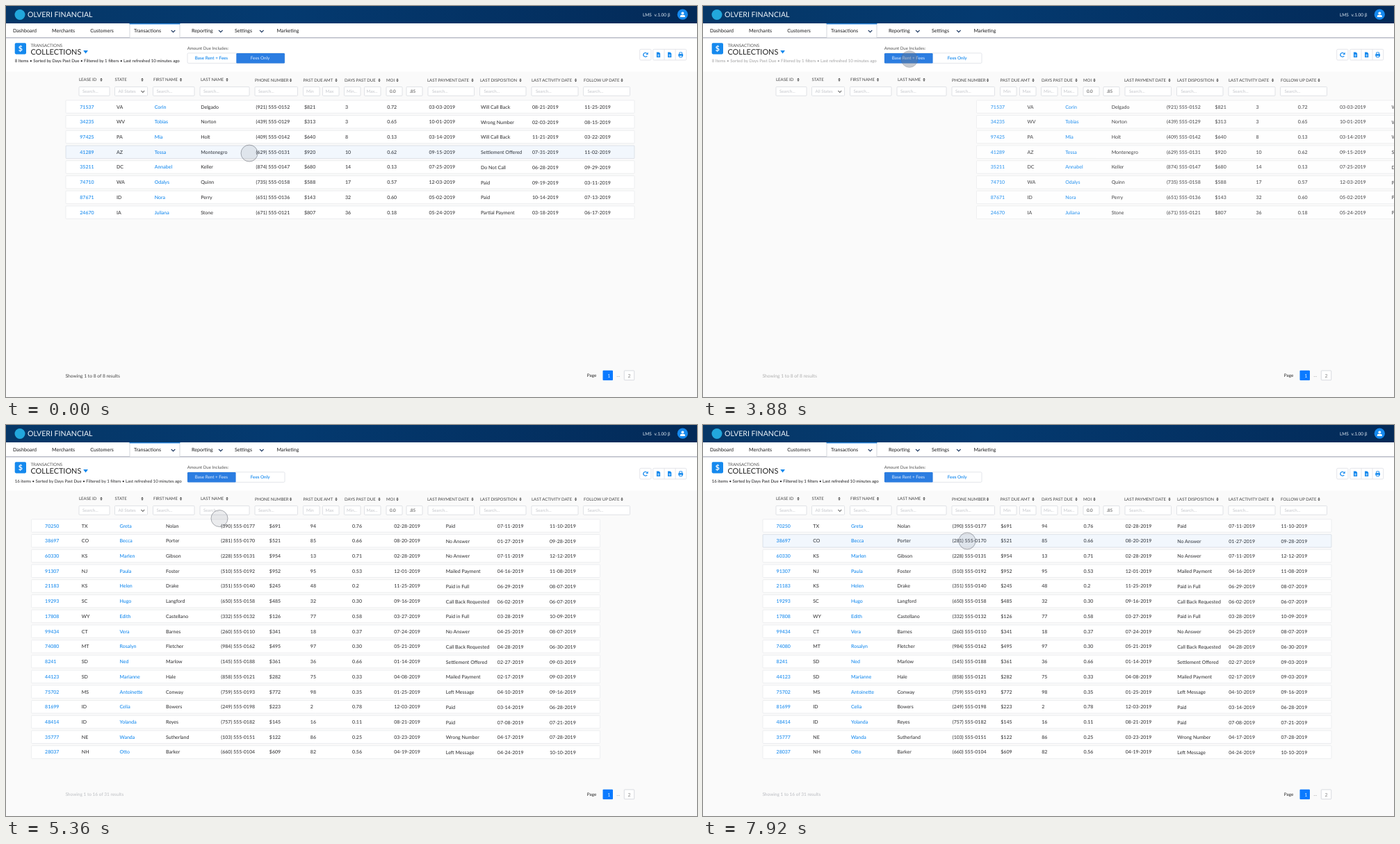
Recreate the animation shown at these times as an HTML page with a canvas. Size 994 by 563 pixels, loop 8000 ms.

```html
<!DOCTYPE html>
<html lang="en">
<head>
<meta charset="utf-8">
<title>Collections</title>
<style>
html, body { margin: 0; width: 100%; height: 100%; overflow: hidden; background: #fafafa; }
canvas { display: block; width: 100vw; height: 100vh; }
</style>
</head>
<body>
<canvas id="stage"></canvas>
<script>
const W = 994, H = 563, LOOP = 8000, STEP = 40;
const SKY = '#1589ee', INK = '#3a3a3c', LINE = '#dcdfe5';
const canvas = document.getElementById('stage');
const dpr = window.devicePixelRatio || 1;
canvas.width = Math.round(W * dpr);
canvas.height = Math.round(H * dpr);
const c = canvas.getContext('2d');

// id | state | first | last | area and line of the phone | due | days | MOI | paid | disposition | activity | follow up
const parse = s => s.trim().split('\n').map(line => line.split('|').map((cell, i) =>
  i === 4 ? `(${cell.slice(0, 3)}) 555-01${cell.slice(3)}` :
  i === 5 ? '$' + cell :
  i === 8 || i > 9 ? cell + '-2019' : cell));

const feesRows = parse(`
71537|VA|Corin|Delgado|92152|821|3|0.72|03-03|Will Call Back|08-21|11-25
34235|WV|Tobias|Norton|43929|313|3|0.65|10-01|Wrong Number|02-03|08-15
97425|PA|Mia|Holt|40942|640|8|0.13|03-14|Will Call Back|11-21|03-22
41289|AZ|Tessa|Montenegro|62931|920|10|0.62|09-15|Settlement Offered|07-31|11-02
35211|DC|Annabel|Keller|87447|680|14|0.13|07-25|Do Not Call|06-28|09-29
74710|WA|Odalys|Quinn|73558|588|17|0.57|12-03|Paid|09-19|03-11
87671|ID|Nora|Perry|65136|143|32|0.60|05-02|Paid|10-14|07-13
24670|IA|Juliana|Stone|67121|807|36|0.18|05-24|Partial Payment|03-18|06-17`);

const rentRows = parse(`
70250|TX|Greta|Nolan|39077|691|94|0.76|02-28|Paid|07-11|11-10
38697|CO|Becca|Porter|28170|521|85|0.66|08-20|No Answer|01-27|09-28
60330|KS|Marlen|Gibson|22831|954|13|0.71|02-28|No Answer|07-11|12-12
91307|NJ|Paula|Foster|51092|952|95|0.53|12-01|Mailed Payment|04-16|11-08
21183|KS|Helen|Drake|35140|245|48|0.2|11-25|Paid in Full|06-29|08-07
19293|SC|Hugo|Langford|65058|485|32|0.30|09-16|Call Back Requested|06-02|06-07
17808|WY|Edith|Castellano|33232|126|77|0.58|03-27|Paid in Full|03-28|10-09
99434|CT|Vera|Barnes|26010|341|18|0.37|07-24|No Answer|04-25|08-07
74080|MT|Rosalyn|Fletcher|98462|495|97|0.30|05-21|Call Back Requested|04-28|06-30
8241|SD|Ned|Marlow|14588|361|36|0.66|01-14|Settlement Offered|02-27|09-03
44123|SD|Marianne|Hale|85821|282|75|0.33|04-08|Mailed Payment|02-17|09-03
75702|MS|Antoinette|Conway|75993|772|98|0.35|01-25|Left Message|04-10|09-16
81699|ID|Celia|Bowers|24998|223|2|0.78|12-03|Paid|03-14|06-28
48414|ID|Yolanda|Reyes|75782|145|16|0.11|08-21|Paid|07-08|07-21
35777|NE|Wanda|Sutherland|10351|122|86|0.25|03-23|Wrong Number|04-17|07-28
28037|NH|Otto|Barker|66004|609|82|0.56|04-19|Left Message|04-24|10-10`);

const cellX = [106.3, 159, 213.7, 280.2, 359.5, 429, 488, 548.3, 608.4, 683, 757, 832.2];

// label, label x, sort arrow x
const heads = [
  ['LEASE ID', 105, 137], ['STATE', 156.5, 196], ['FIRST NAME', 212, 251.5],
  ['LAST NAME', 280, 318], ['PHONE NUMBER', 358, 409.5], ['PAST DUE AMT', 427.5, 475],
  ['DAYS PAST DUE', 487, 537], ['MOI', 547, 563], ['LAST PAYMENT DATE', 606, 671],
  ['LAST DISPOSITION', 682, 740], ['LAST ACTIVITY DATE', 756, 819.5], ['FOLLOW UP DATE', 831, 886]
];

// hint, left, right, text x
const fields = [
  ['Search...', 105, 149, 110], ['All States', 156.5, 203.5, 161.5], ['Search...', 211.5, 271, 216.5],
  ['Search...', 279, 350, 284], ['Search...', 358, 419.5, 363], ['Min', 427.5, 451, 432],
  ['Max', 455.5, 479, 459.5], ['Min...', 486.5, 510, 490], ['Max...', 515.5, 539, 518.5],
  ['0.0', 547, 570, 552], ['.85', 576, 599, 580.5], ['Search...', 607, 673.5, 613],
  ['Search...', 681.5, 748, 687.5], ['Search...', 756, 823, 762], ['Search...', 830.5, 897.5, 836.5]
];

// pointer: time, x, y
const path = [
  [200, 350, 212], [1040, 353, 171.5], [1880, 349.5, 146], [2720, 314.5, 97.5],
  [2800, 310, 91.5], [3480, 297, 76.5], [4680, 297, 76.5], [5040, 297.5, 111],
  [5360, 307, 134.5], [5560, 309, 140.5], [6400, 312.5, 163.5], [6960, 338, 184],
  [7200, 344.5, 188.5], [7920, 380, 167]
];

const clamp = v => Math.max(0, Math.min(1, v));
const span = (t, a, b) => clamp((t - a) / (b - a));
const ease = u => (1 - Math.cos(Math.PI * u)) / 2;

// monotone cubic through the path points
function slope(i, k) {
  if (i === 0 || i === path.length - 1) return 0;
  const rate = j => (path[j + 1][k] - path[j][k]) / (path[j + 1][0] - path[j][0]);
  const a = rate(i - 1), b = rate(i);
  return a * b > 0 ? 2 * a * b / (a + b) : 0;
}

function pointer(t, k) {
  const last = path.length - 1;
  if (t <= path[0][0]) return path[0][k];
  if (t >= path[last][0]) return path[last][k];
  let i = 0;
  while (path[i + 1][0] <= t) i++;
  const p = path[i], q = path[i + 1], d = q[0] - p[0];
  const u = (t - p[0]) / d, v = 1 - u;
  return p[k] * (1 + 2 * u) * v * v + q[k] * u * u * (3 - 2 * u)
    + d * u * v * (slope(i, k) * v - slope(i + 1, k) * u);
}

function text(s, x, mid, size, color = INK, weight = 400) {
  c.font = `${weight} ${size}px Lato, "Open Sans", sans-serif`;
  c.fillStyle = color;
  c.fillText(s, x, mid + size * 0.36);
}

function rect(x, y, w, h, fill) {
  c.fillStyle = fill;
  c.fillRect(x, y, w, h);
}

function box(x, y, w, h, r, fill, stroke, line = 0.8) {
  c.beginPath();
  c.roundRect(x, y, w, h, r);
  if (fill) { c.fillStyle = fill; c.fill(); }
  if (stroke) { c.strokeStyle = stroke; c.lineWidth = line; c.stroke(); }
}

function disc(x, y, r, fill) {
  c.beginPath();
  c.arc(x, y, r, 0, 2 * Math.PI);
  c.fillStyle = fill;
  c.fill();
}

function poly(points, fill) {
  c.beginPath();
  points.forEach(([x, y]) => c.lineTo(x, y));
  c.fillStyle = fill;
  c.fill();
}

function chevron(x, y, r, color, line) {
  c.beginPath();
  c.moveTo(x - r, y - r / 2);
  c.lineTo(x, y + r / 2);
  c.lineTo(x + r, y - r / 2);
  c.strokeStyle = color;
  c.lineWidth = line;
  c.stroke();
}

function faded(alpha, draw) {
  if (alpha <= 0) return;
  c.save();
  c.globalAlpha = alpha;
  draw();
  c.restore();
}

function topBar() {
  const g = c.createLinearGradient(0, 0, W, 0);
  g.addColorStop(0, '#063767');
  g.addColorStop(0.4, '#043a70');
  g.addColorStop(1, '#032a58');
  rect(0, 0, W, 25, g);
  disc(20, 12.5, 7.5, '#22a7dc');
  text('OLVERI FINANCIAL', 31, 12.5, 10.6, '#eef4fa');
  text('LMS', 916, 13, 6.5, '#e4ecf5');
  text('v.1.00 β', 932.5, 13, 6.5, '#e4ecf5');
  disc(973.3, 12.2, 7.6, SKY);
  disc(973.3, 10.3, 1.9, '#fff');
  box(969.8, 12.7, 7, 3.2, [2, 2, 0.5, 0.5], '#fff');
}

function nav() {
  rect(0, 25, W, 20.3, '#fff');
  rect(0, 45, W, 1.2, '#b4b7c2');
  rect(0, 46.2, W, 1.2, '#e3e4e9');
  rect(177.6, 25, 72.8, 21.2, '#c9ccd4');
  rect(178.4, 25, 71.2, 20.3, '#fff');
  rect(177.6, 25, 72.8, 1.4, '#2b86dc');
  [['Dashboard', 10], ['Merchants', 66], ['Customers', 121.3], ['Transactions', 184],
   ['Reporting', 267], ['Settings', 329], ['Marketing', 389.5]]
    .forEach(([s, x]) => text(s, x, 35.5, 7.1, '#2b2b2d', 500));
  [240.5, 308.8, 367.8].forEach(x => chevron(x, 36.3, 2.8, '#16325c', 1.2));
}

function toolIcons() {
  box(911.7, 62.3, 16.3, 15.6, 1.5, '#fff', LINE);
  box(930.7, 62.3, 48, 15.6, 1.5, '#fff', LINE);
  [946.6, 962.6].forEach(x => rect(x, 62.3, 0.8, 15.6, LINE));
  c.beginPath();
  c.arc(919.8, 70.3, 2.9, 0.5, 5.4);
  c.strokeStyle = SKY;
  c.lineWidth = 1.2;
  c.stroke();
  poly([[923.6, 66.5], [923.6, 70], [920.2, 70]], SKY);
  [938.5, 954.6].forEach(x => {
    poly([[x - 2.6, 66.5], [x + 0.8, 66.5], [x + 2.6, 68.3], [x + 2.6, 74], [x - 2.6, 74]], SKY);
    rect(x - 1.2, 70, 2.4, 0.8, '#fff');
    rect(x - 1.2, 71.7, 2.4, 0.8, '#fff');
  });
  box(967.2, 69, 6.8, 3.6, 0.7, SKY);
  box(968.7, 66.8, 3.8, 2.6, 0.2, '#fff', SKY, 0.9);
  box(968.7, 71.2, 3.8, 2.6, 0.2, '#fff', SKY, 0.9);
}

function pageHead(t) {
  rect(0, 47.4, W, 47, '#fff');
  box(12.7, 53.2, 16.3, 16.2, 1.8, SKY);
  c.textAlign = 'center';
  text('$', 20.9, 61.3, 10.5, '#fff', 700);
  c.textAlign = 'left';
  text('TRANSACTIONS', 35.5, 56.5, 6.1, '#555');
  text('COLLECTIONS', 35.5, 66, 10.9, '#222');
  poly([[111.2, 64], [118, 64], [114.6, 68.4]], SKY);

  const tail = 'tems • Sorted by Days Past Due • Filtered by 1 filters • Last refreshed 10 minutes ago';
  faded(1 - 1.7 * ease(span(t, 3560, 4360)), () => text('8 I' + tail, 12.7, 79.2, 6.1, '#2e2e30', 500));
  faded(ease(span(t, 4680, 5480)), () => text('16 i' + tail, 12.7, 80.7, 6.1, '#1c1c1e'));

  text('Amount Due Includes:', 260.7, 60.8, 6.1, '#555');
  toggle(span(t, 3360, 3680));
  toolIcons();
}

function toggle(k) {
  box(261, 67.8, 140, 14.6, 1.5, '#fff', LINE);
  [['Base Rent + Fees', 261, 271.8, k], ['Fees Only', 331.3, 351.8, 1 - k]].forEach(([s, x, tx, on]) => {
    faded(on, () => box(x, 68, 69.6, 14.4, 1.2, '#2b7de1'));
    faded(1 - on, () => text(s, tx, 75.2, 6.3, SKY, 600));
    faded(on, () => text(s, tx, 75.2, 6.3, '#d8e8fc', 500));
  });
}

function tableHead() {
  heads.forEach(([s, x, arrow], i) => {
    const y = i < 4 ? 106.2 : 106.8;
    text(s, x, y, 6.05, '#444');
    poly([[arrow - 1.7, y - 0.5], [arrow + 1.7, y - 0.5], [arrow, y - 2.4]], '#333');
    poly([[arrow - 1.7, y + 0.5], [arrow + 1.7, y + 0.5], [arrow, y + 2.4]], '#333');
  });
  fields.forEach(([s, l, r, x]) => {
    box(l, 116.4, r - l, 12.9, 1, '#fff', '#d9dbe0');
    text(s, x, 122.6, 6.2, /\d/.test(s) ? '#444' : '#c3c5ca');
  });
  chevron(196.8, 123.2, 2.4, '#777', 1.1);
}

function rows(list, dx, nudge) {
  list.forEach((cells, i) => {
    const y = 145 + 21.73 * i;
    box(86 + dx, y - 9.2, 818, 18.5, 0.8, '#fff', '#e9eaec');
    cells.forEach((s, k) => {
      const link = k === 0 || k === 2;
      text(s, cellX[k] + nudge + dx, y + (k > 8 ? 0.5 : 0), 7, link ? SKY : INK, 500);
    });
  });
}

function hover(t, y) {
  const alpha = t < 4000 ? 1 - span(t, 3000, 3560) : span(t, 5600, 6200);
  let mid = Math.max(145, y);
  if (t < 1880) mid -= 1.7 * (1 - span(t, 240, 1040));
  faded(alpha, () => box(86, mid - 9.2, 818, 18.5, 0.8, 'rgba(45,115,215,0.06)', 'rgba(110,130,165,0.1)'));
}

function table(t, y) {
  const out = ease(span(t, 3560, 4360));
  const come = ease(span(t, 4680, 5480));
  faded(1 - out * out, () => rows(feesRows, 890 * out, 0));
  faded(Math.min(1, 2.4 * come), () => rows(rentRows, 908 * (come - 1), -0.7));
  hover(t, y);
  faded(1 - 1.7 * out, () => text('Showing 1 to 8 of 8 results', 85.4, 532.8, 6.7, '#444'));
  faded(come, () => text('Showing 1 to 16 of 31 results', 85.4, 531.2, 6.5, '#b9bbc0'));
}

function pager() {
  text('Page', 835.8, 531.7, 6.3, '#333', 500);
  box(858.5, 524.7, 14.5, 14.3, 1, '#0a7aff');
  text('1', 865.3, 532, 7, '#e4f0ff');
  text('...', 878.3, 531.8, 7, '#999');
  box(889.3, 525, 14.4, 13.7, 0.8, '#fff', '#cfd2d8');
  text('2', 894.5, 532, 7, '#888');
}

function cursor(t, x, y) {
  const press = span(t, 3280, 3520) * (1 - span(t, 4680, 5000));
  disc(x, y, 12, `rgba(112,120,136,${0.14 + 0.26 * press})`);
  c.strokeStyle = `rgba(90,94,104,${0.62 - 0.35 * press})`;
  c.lineWidth = 0.8;
  c.stroke();
}

function draw(t) {
  c.setTransform(canvas.width / W, 0, 0, canvas.height / H, 0, 0);
  c.textRendering = 'geometricPrecision';
  rect(0, 0, W, H, '#fafafa');
  const x = pointer(t, 1), y = pointer(t, 2);
  topBar();
  nav();
  pageHead(t);
  tableHead();
  table(t, y);
  pager();
  cursor(t, x, y);
}

const start = performance.now();
function tick() {
  const t = (performance.now() - start) % LOOP;
  draw(Math.floor(t / STEP) * STEP);
  requestAnimationFrame(tick);
}
tick();
</script>
</body>
</html>
```
